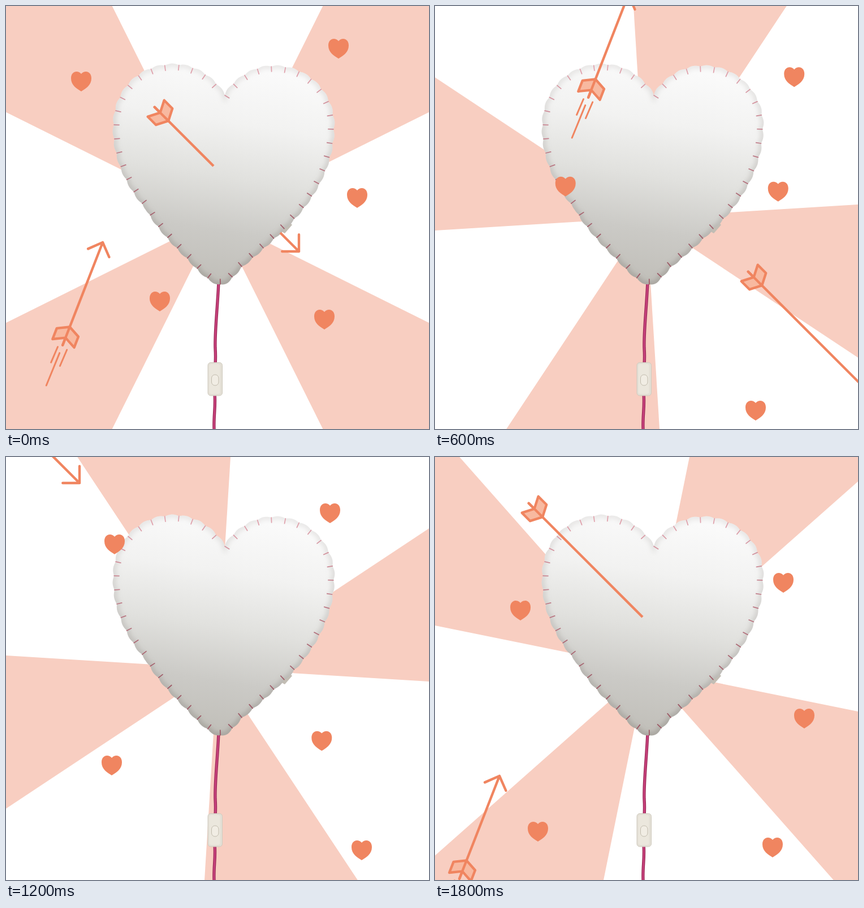
Write an HTML page that moves like this. It is 748 px wide and 748 px high and loops after 2000 ms.

```html
<!DOCTYPE html>
<html lang="en">
<head>
<meta charset="utf-8">
<title>Heart lamp</title>
<style>
  html, body { margin: 0; height: 100%; overflow: hidden; background: #fff; }
  svg { display: block; width: 100vw; height: 100vh; }
  .line { fill: none; stroke: #f08560; stroke-width: 4.4; stroke-linecap: round; stroke-linejoin: round; }
  .trail { stroke-width: 3; }
</style>
</head>
<body>
<svg viewBox="0 0 748 748">
  <defs>
    <path id="seam" d="M387 158C405 128 440 105 478 107C535 109 579 155 579 212C579 290 535 355 486 399C460 424 430 450 414 463C400 480 390 492 378 492C362 488 345 472 323 448C297 423 263 386 249 359C208 311 190 262 191 213C191 150 235 104 298 104C335 105 365 125 387 158Z"/>
    <path id="felt"/>
    <path id="heart" fill="#f08560" d="M0-13C6-20 18-18 18-5C18 7 8 13 0 18C-8 13-18 7-18-5C-18-18-6-20 0-13Z"/>
    <path id="wedge" fill="#f8cec1" d="M0 0L600-201V201Z"/>
    <path id="feathers" style="fill:#f8b9a0" d="M14 0L3.5-20.5H24L34.6 0L24 20.5H3.5Z M0 0H34"/>
    <clipPath id="inFelt"><use href="#felt"/></clipPath>
    <clipPath id="outsidePierced"><path d="M-500 1150V-500H1150ZM-200 1086L1086-200L1500 1500Z"/></clipPath>
    <linearGradient id="shade" gradientUnits="userSpaceOnUse" x1="410" y1="110" x2="350" y2="490">
      <stop offset="0" stop-color="#fafafa"/>
      <stop offset=".25" stop-color="#f2f2f1"/>
      <stop offset=".5" stop-color="#e1e1de"/>
      <stop offset=".75" stop-color="#cbcac6"/>
      <stop offset="1" stop-color="#c0beb8"/>
    </linearGradient>
    <linearGradient id="rim" gradientUnits="userSpaceOnUse" x1="0" y1="110" x2="0" y2="480">
      <stop offset="0" stop-color="#c8c4c2"/>
      <stop offset="1" stop-color="#77726b"/>
    </linearGradient>
    <linearGradient id="thread" gradientUnits="userSpaceOnUse" x1="0" y1="100" x2="0" y2="400">
      <stop offset="0" stop-color="#e3a3ae"/>
      <stop offset="1" stop-color="#9d5663"/>
    </linearGradient>
    <filter id="soft" x="-20%" y="-20%" width="140%" height="140%"><feGaussianBlur stdDeviation="5"/></filter>
  </defs>

  <g id="rays">
    <use href="#wedge"/><use href="#wedge" transform="rotate(90)"/>
    <use href="#wedge" transform="rotate(180)"/><use href="#wedge" transform="rotate(270)"/>
  </g>

  <g fill="none" stroke="#9c2b58" stroke-width="5.4">
    <path id="cord" d="M376 488C374 535 369 575 370 605Q371 620 370 634M369 686C371 708 367 724 368 748"/>
    <use href="#cord" stroke="#c6407b" stroke-width="3"/>
  </g>
  <rect x="357" y="630.5" width="25.5" height="58.5" rx="5" fill="#e3dfd5" stroke="#d0cbbf"/>
  <rect x="359.5" y="633" width="19" height="53" rx="4" fill="#ebe7dd"/>
  <rect x="363.5" y="652" width="12.5" height="19" rx="6" fill="#f1ede4" stroke="#c2bcae"/>

  <path d="M482 396L499 380L506 387L493 402Z" fill="#c2bdb4"/>
  <use href="#felt" fill="url(#shade)"/>
  <g clip-path="url(#inFelt)">
    <use href="#felt" fill="none" stroke="url(#rim)" stroke-opacity=".45" stroke-width="8" filter="url(#soft)"/>
  </g>
  <path id="stitches" fill="none" stroke-width="1.7" stroke="url(#thread)" stroke-linecap="round"/>

  <g id="hearts"></g>
  <g id="rising" class="line">
    <path d="M-195 0H0M-20-20L0 0L-20 20"/>
    <use href="#feathers" x="-195"/>
    <path class="trail" d="M-201-7L-231-8M-200 10L-231 9M-210 0L-272-1"/>
  </g>
  <g clip-path="url(#outsidePierced)">
    <g id="piercing" class="line">
      <path d="M-361 0H0M-21-21L0 0L-21 21"/>
      <use href="#feathers" x="-361"/>
    </g>
  </g>
</svg>
<script>
const STEP = 200, STEPS = 10, STITCHES = 50;
const $ = id => document.getElementById(id);

// Waypoints [step, x, y]; steps past 9 run into the next loop.
const heartPaths = [
  [[4, 123, 713], [6, 187, 545], [10, 133, 133], [12, 151, 14]],
  [[9, 182, 662], [10, 272, 522], [14, 217, 251], [18, 167, 57]],
  [[3, 567, 715], [5, 544, 571], [9, 616, 222], [10, 588, 75]],
  [[6, 629, 695], [9, 653, 462], [10, 621, 339], [14, 640, 54]],
  [[9, 597, 690], [10, 563, 554], [12, 618, 404], [16, 573, 99]]
];

const unwrap = (step, first) => step < first ? step + STEPS : step;

// Height gained by all hearts: steady, with a rush in the last two steps of a loop.
function climb(step) {
  const local = step % STEPS;
  return 820 * Math.floor(step / STEPS) + 68 * local + 70 * Math.max(0, local - 8);
}

function along(path, step) {
  step = unwrap(step, path[0][0]);
  let i = 1;
  while (i < path.length - 1 && path[i][0] < step) i++;
  const [s0, x0, y0] = path[i - 1], [s1, x1, y1] = path[i];
  const k = (climb(step) - climb(s0)) / (climb(s1) - climb(s0));
  return [x0 + (x1 - x0) * k, y0 + (y1 - y0) * k];
}

function place(el, [x, y], angle = 0) {
  el.setAttribute("transform", `translate(${x} ${y}) rotate(${angle})`);
}

// Puffs the edge out between stitches and sews a short thread at each one.
function sewFelt() {
  const seam = $("seam"), total = seam.getTotalLength(), samples = STITCHES * 8;
  let edge = "", threads = "";
  for (let i = 0; i < samples; i++) {
    const at = i / samples * total;
    const p = seam.getPointAtLength(at), q = seam.getPointAtLength((at + 1) % total);
    const nx = p.y - q.y, ny = q.x - p.x;
    const puff = 2.5 * Math.abs(Math.sin(Math.PI * i / 8));
    edge += `${i ? "L" : "M"}${p.x - nx * puff} ${p.y - ny * puff}`;
    if (i % 8 === 0) threads += `M${p.x} ${p.y}l${nx * 9} ${ny * 9}`;
  }
  $("felt").setAttribute("d", edge + "Z");
  $("stitches").setAttribute("d", threads);
}

const hearts = heartPaths.map(() => {
  const el = document.createElementNS("http://www.w3.org/2000/svg", "use");
  el.setAttribute("href", "#heart");
  return $("hearts").appendChild(el);
});

function draw(now) {
  const step = Math.floor(now / STEP) % STEPS;
  place($("rays"), [374, 374], 45 + 15 * Math.ceil(step * 1.22));
  hearts.forEach((el, i) => place(el, along(heartPaths[i], step)));

  const rise = unwrap(step, 8) - 8;
  place($("rising"), [57 + 57 * rise, 710 - 146 * rise], -68.7);
  const flight = 97 * (unwrap(step, 6) - 6);
  place($("piercing"), [130 + flight, 46 + flight], 45);
  requestAnimationFrame(draw);
}

sewFelt();
draw(performance.now());
</script>
</body>
</html>
```
